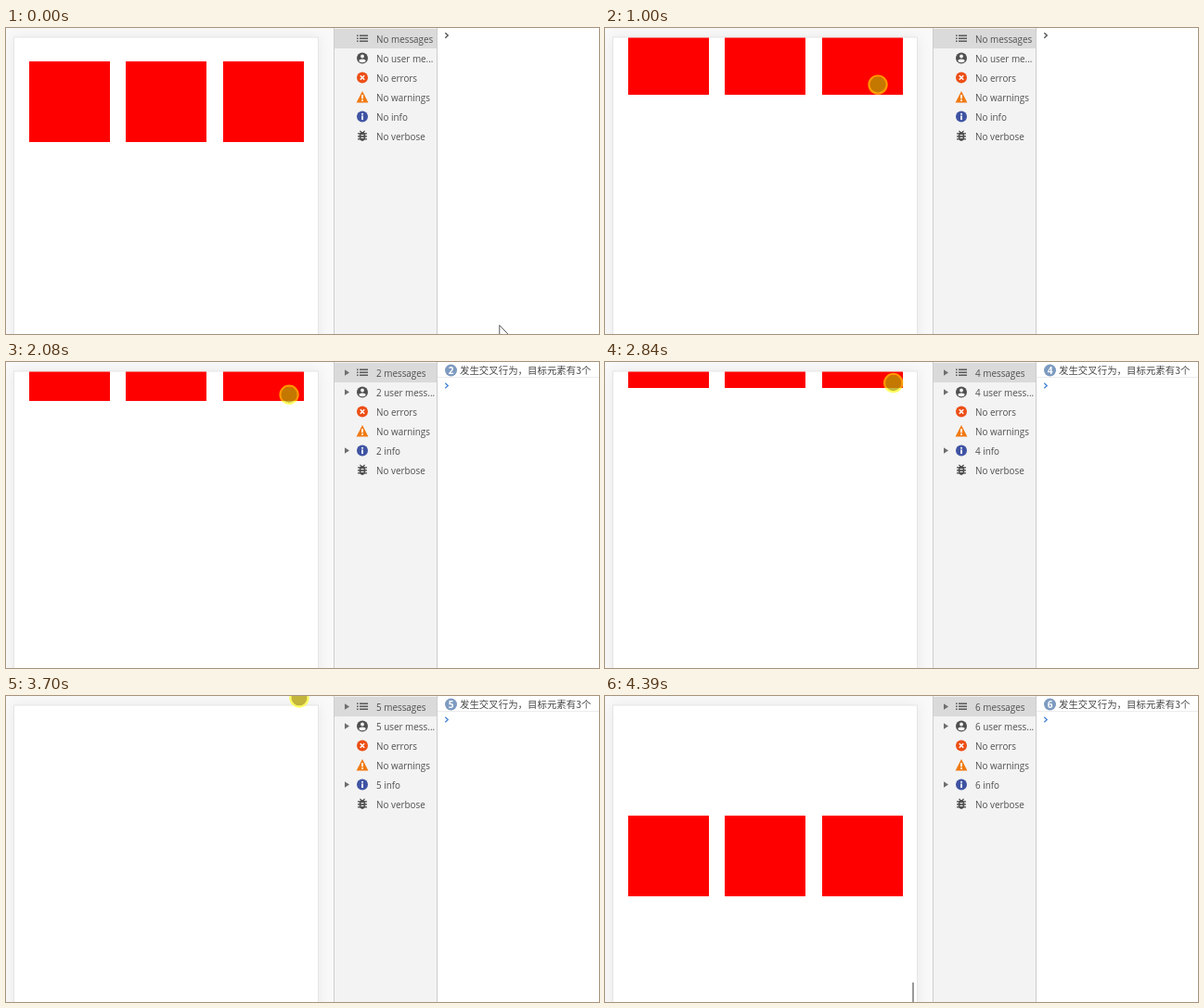
Animation, 639 px wide and 330 px high, one loop 4470 ms. Source, as an HTML page with a canvas:

```html
<!DOCTYPE html>
<html lang="zh">
<head>
<meta charset="utf-8">
<title>Intersection demo</title>
<style>
html, body { margin: 0; width: 100%; height: 100%; overflow: hidden; background: #fff; }
canvas { display: block; width: 639px; height: 330px; }
</style>
</head>
<body>
<canvas id="stage"></canvas>
<script>
const W = 639, H = 330, LOOP = 4470, STEPS = 58;
const INK = '#505050', PANEL = '#f3f3f3';
const canvas = document.getElementById('stage');
const ctx = canvas.getContext('2d');
const ratio = window.devicePixelRatio || 1;
canvas.width = W * ratio;
canvas.height = H * ratio;

// motion, counted in steps of the recording clock
const PRESS = 6, REST = 19, FLING = 48, RELEASE = 52;
const dabs = [[23, 33], [35, 45]];
const messageSteps = [21, ...dabs.flatMap(([from, to]) => [from + 1, to]), FLING + 1];

const mix = (a, b, k) => a + (b - a) * k;
const span = (s, from, to) => Math.min(1, Math.max(0, (s - from) / (to - from)));
const easeOut = k => 1 - (1 - k) ** 2;
const smooth = k => k * k * (3 - 2 * k);

// a nudge down, a swipe off the top, two short dabs, then a fling down
function fingerY(s) {
  if (s < 10) return mix(116, 135, smooth(span(s, 5, 10)));
  let y = mix(135, 2, easeOut(span(s, 10, REST)));
  for (const [from, to] of dabs) y += 35 * Math.sin(Math.PI * span(s, from, to));
  return y + 207 * easeOut(span(s, FLING, 57));
}

const fingerX = s => 282 + 34 * span(s, 7, FLING) ** 0.54;
// the page follows the finger slightly late
const squaresTop = s => Math.round(fingerY(s - 0.2) - 80);

function pointerAt(s) {
  if (s < PRESS) {
    const k = easeOut(span(s, 0, 5));
    return [mix(531, 282, k), mix(320, 116, k)];
  }
  if (s < RELEASE) return [fingerX(s), fingerY(s)];
  const k = (s - RELEASE + 1) / 2;
  return [mix(316, 484, k), mix(116, 318, k)];
}

function rect(x, y, w, h, color) {
  ctx.fillStyle = color;
  ctx.fillRect(x, y, w, h);
}

function oval(x, y, rx, ry, color) {
  ctx.fillStyle = color;
  ctx.beginPath();
  ctx.ellipse(x, y, rx, ry, 0, 0, Math.PI * 2);
  ctx.fill();
}

const disc = (x, y, r, color) => oval(x, y, r, r, color);

function shape(points, color) {
  ctx.fillStyle = color;
  ctx.beginPath();
  points.forEach(([x, y]) => ctx.lineTo(x, y));
  ctx.closePath();
  ctx.fill();
}

function line(points, color, width) {
  ctx.strokeStyle = color;
  ctx.lineWidth = width;
  ctx.beginPath();
  points.forEach(([x, y]) => ctx.lineTo(x, y));
  ctx.stroke();
}

function text(str, x, y, font, color, align = 'left') {
  ctx.font = font;
  ctx.fillStyle = color;
  ctx.textAlign = align;
  ctx.fillText(str, x, y);
}

function clipped(x, y, w, h, paint) {
  ctx.save();
  ctx.beginPath();
  ctx.rect(x, y, w, h);
  ctx.clip();
  paint();
  ctx.restore();
}

function drawPage(top) {
  rect(0, 0, 353, H, '#f9f9f9');
  clipped(0, 0, 353, H, () => {
    ctx.shadowColor = 'rgba(0,0,0,.07)';
    ctx.shadowBlur = 14 * ratio;
    rect(8, 9.5, 329, H + 20, '#e5e5e5');
  });
  rect(9, 10.5, 327, H, '#fff');
  clipped(9, 10.5, 327, H, () => {
    for (let i = 0; i < 3; i++) rect(Math.round(24.6 + i * 104.6), top, 87, 87, '#f00');
    rect(331, 309 + (129 - top) * 0.3, 2, 60, '#999');
  });
}

// sidebar icons, each drawn around the origin
function listIcon() {
  for (const y of [-4, -1, 2]) {
    rect(-6, y, 1.6, 1.4, INK);
    rect(-3, y, 9, 1.4, INK);
  }
}

function userIcon() {
  disc(0, 0, 6, INK);
  disc(0, -2, 1.9, PANEL);
  oval(0, 2.8, 3.6, 1.9, PANEL);
}

function errorIcon() {
  disc(0, 0, 6, '#ec4f16');
  for (const d of [-2.2, 2.2]) line([[-2.2, d], [2.2, -d]], '#fff', 1.5);
}

function warningIcon() {
  shape([[0, -6.5], [6.4, 6], [-6.4, 6]], '#f07a12');
  rect(-0.9, -2.5, 1.8, 4.3, '#fff');
  rect(-0.9, 2.8, 1.8, 1.6, '#fff');
}

function infoIcon() {
  disc(0, 0, 6, '#3f53a3');
  rect(-0.9, -3.6, 1.8, 1.7, '#fff');
  rect(-0.9, -1, 1.8, 4.6, '#fff');
}

function bugIcon() {
  for (const y of [-3, 0, 3]) rect(-5, y - 0.3, 10, 1.3, INK);
  line([[-2.6, -5.6], [0, -3], [2.6, -5.6]], INK, 1.3);
  oval(0, 0.4, 3.4, 5, INK);
  for (const y of [-1.4, 1.4]) rect(-1.5, y, 3, 1.1, PANEL);
}

function drawSidebar(count) {
  rect(353, 0, 112, H, '#cdcdcd');
  rect(354, 0, 110, H, PANEL);
  rect(354, 1, 110, 21, '#dadada');
  const n = count || 'No';
  const rows = [
    [listIcon, count === 1 ? '1 message' : `${n} messages`, true],
    [userIcon, count ? `${n} user mess...` : 'No user me...', true],
    [errorIcon, 'No errors'],
    [warningIcon, 'No warnings'],
    [infoIcon, `${n} info`, true],
    [bugIcon, 'No verbose']
  ];
  rows.forEach(([icon, label, expands], i) => {
    const y = 11.5 + i * 21;
    ctx.save();
    ctx.translate(384, y);
    icon();
    ctx.restore();
    text(label, 399, y + 4.3, '9.9px "Open Sans", sans-serif', INK);
    if (count && expands) shape([[365, y - 3.2], [370, y], [365, y + 3.2]], '#6e6e6e');
  });
}

function drawConsole(count) {
  rect(465, 0, W - 465, H, '#fff');
  if (count) {
    const badge = count > 1;
    text('发生交叉行为，目标元素有3个', badge ? 489 : 485, 12.8,
      '300 10.45px "Noto Sans CJK SC", "Noto Sans CJK", sans-serif', '#484848');
    if (badge) {
      disc(479.5, 9, 6.5, '#7d9bc0');
      text(count, 479.5, 12.8, 'bold 10px "Open Sans", sans-serif', '#fff', 'center');
    }
    rect(465, 16, W - 465, 1, '#ececec');
  }
  const y = count ? 25.5 : 8;
  line([[473.3, y - 2.7], [476.2, y], [473.3, y + 2.7]], count ? '#4a86d8' : '#555', 1.4);
}

function drawTouch(x, y) {
  disc(x, y, 8.6, 'rgba(178,158,0,.76)');
  ctx.strokeStyle = 'rgba(255,255,0,.6)';
  ctx.lineWidth = 2.2;
  ctx.beginPath();
  ctx.arc(x, y, 9.6, 0, Math.PI * 2);
  ctx.stroke();
}

function drawArrow(x, y) {
  const outline = [[0, 0], [0, 14.5], [3.3, 11.4], [5.6, 16.4], [7.7, 15.4], [5.5, 10.5], [10, 10.5]]
    .map(([dx, dy]) => [x + 0.8 + dx, y + 0.5 + dy]);
  shape(outline, '#fff');
  line([...outline, outline[0]], '#444', 0.9);
}

function draw(time) {
  // the lead absorbs the coarse rounding of the recording clock
  const step = Math.min(STEPS - 1, Math.floor((time % LOOP + 14) / LOOP * STEPS));
  const count = messageSteps.filter(s => step >= s).length;
  const drawPointer = step >= PRESS && step < RELEASE ? drawTouch : drawArrow;
  ctx.setTransform(ratio, 0, 0, ratio, 0, 0);
  drawPage(squaresTop(step));
  drawSidebar(count);
  drawConsole(count);
  drawPointer(...pointerAt(step));
}

const start = performance.now();
function loop() {
  draw(performance.now() - start);
  requestAnimationFrame(loop);
}
loop();
</script>
</body>
</html>
```
